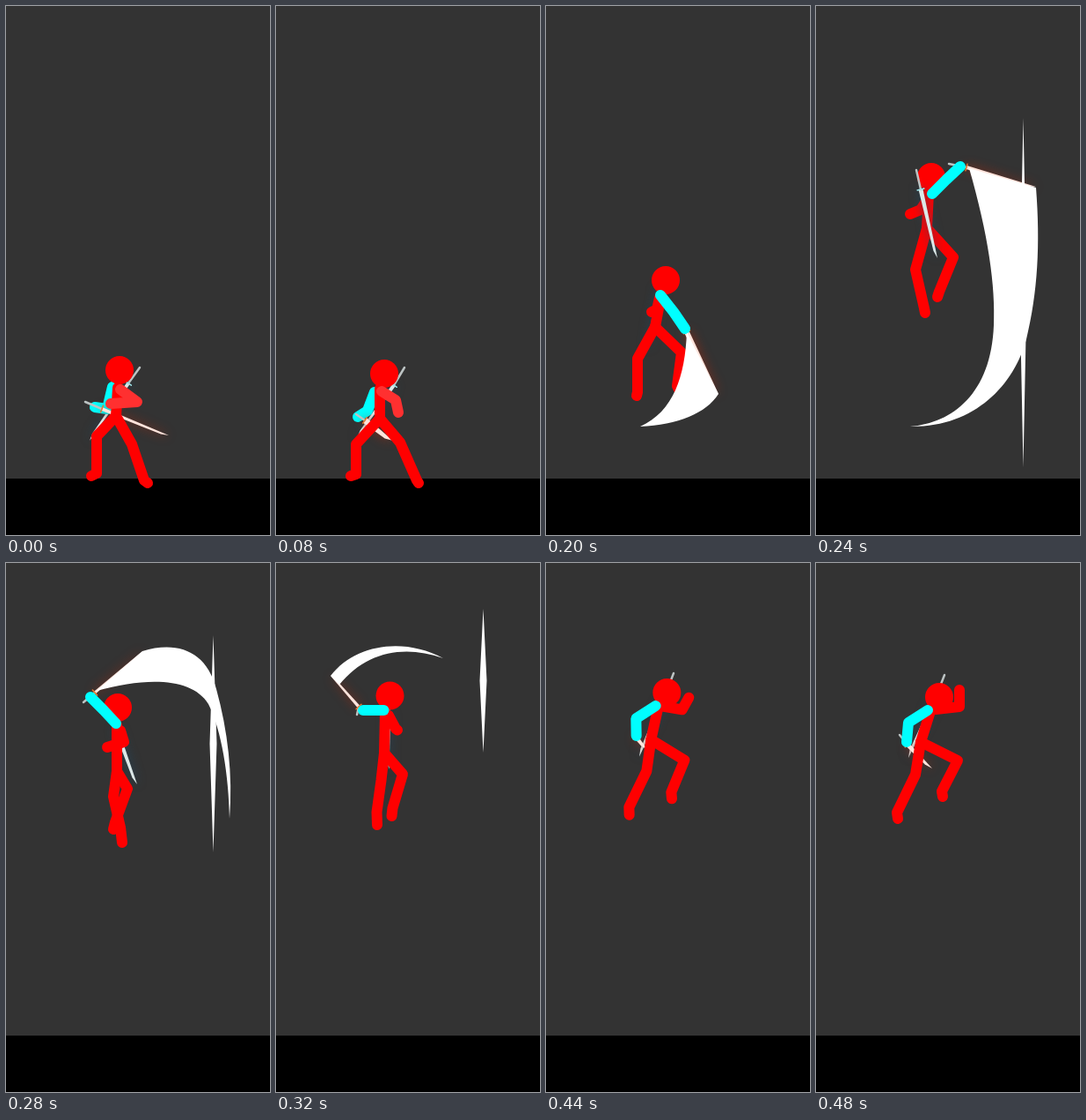
An HTML page with a canvas for the animation above (0.52 s loop, 300 px wide and 600 px high).

```html
<!DOCTYPE html>
<html lang="en">
<head>
<meta charset="utf-8">
<title>Sword leap</title>
<style>
  html, body { margin: 0; width: 100%; height: 100%; overflow: hidden; background: #333; }
  canvas { display: block; }
</style>
</head>
<body>
<canvas id="stage" width="300" height="600"></canvas>
<script>
const ctx = document.getElementById('stage').getContext('2d');
const STEP = 40, STEPS = 13;
const RED = '#f00', PALE = '#ff3030', CYAN = '#0ff';

// Joints are x,y pairs: limbs run outward from the body, swords run pommel, guard, tip.
const guardPose = {
  at: 0, head: [129, 413], torso: [127, 433, 125, 465],
  rear: [103, 488, 103, 530, 97, 533], lead: [143, 497, 157, 538, 161, 541],
  free: [130, 435, 149, 449, 119, 451], grip: [121, 432, 115, 457, 101, 455],
  back: [152, 410, 139, 428, 95, 493], held: [90, 449, 109, 457, 185, 487], width: [4, 4]
};
const windPose = {
  at: 2, head: [123, 417], torso: [118, 434, 118, 468],
  rear: [91, 497, 91, 531, 85, 533], lead: [141, 495, 160, 538, 162, 541],
  free: [120, 437, 136, 447, 139, 461], grip: [112, 438, 104, 459, 93, 466],
  back: [146, 410, 134, 430, 92, 490], held: [91, 463, 101, 470, 133, 493], width: [4, 7]
};
const crouchPose = {
  at: 4, head: [141, 429], torso: [132, 443, 121, 473],
  rear: [92, 500, 86, 532, 82, 533], lead: [155, 500, 157, 537, 164, 538],
  free: [130, 445, 134, 452, 134, 455], grip: [126, 441, 107, 452, 88, 464],
  back: [150, 416, 140, 432, 95, 492], held: [92, 462, 85, 464, 48, 476], width: [6, 9]
};
const risePose = {
  at: 5, head: [136, 311], torso: [131, 327, 124, 364],
  rear: [104, 400, 104, 438, 103, 442], lead: [154, 393, 149, 431, 151, 435],
  free: [129, 331, 126, 344, 120, 347], grip: [130, 328, 145, 347, 158, 366],
  back: [132, 301, 130, 320, 116, 389], held: [151, 350, 160, 370, 196, 440], width: [5, 6]
};
const cutPose = {
  at: 6, head: [131, 194], torso: [128, 211, 126, 252],
  rear: [113, 299, 123, 343, 124, 348], lead: [156, 285, 140, 324, 138, 330],
  free: [128, 217, 119, 231, 107, 236], grip: [132, 213, 148, 197, 164, 182],
  back: [114, 186, 119, 208, 138, 286], held: [151, 179, 171, 183, 250, 205], width: [5, 4]
};
const overPose = {
  at: 7, head: [127, 164], torso: [126, 184, 126, 236],
  rear: [122, 265, 130, 300, 132, 317], lead: [138, 256, 124, 294, 122, 302],
  free: [130, 190, 134, 203, 115, 209], grip: [125, 182, 111, 167, 96, 152],
  back: [117, 167, 125, 188, 149, 251], held: [88, 158, 101, 147, 155, 100], width: [5, 3]
};
const runPose = {
  at: 9, head: [132, 137], torso: [122, 156, 120, 195],
  rear: [117, 228, 99, 265, 98, 277], lead: [150, 223, 141, 262, 141, 272],
  free: [126, 156, 138, 173, 161, 170], grip: [120, 152, 97, 167, 102, 182],
  back: [143, 121, 131, 153, 108, 217], held: [105, 184, 99, 180, 83, 171], width: [4, 4]
};
const driftPose = {
  at: 12, head: [140, 152], torso: [130, 168, 119, 203],
  rear: [113, 240, 92, 283, 93, 290], lead: [161, 224, 143, 259, 144, 265],
  free: [136, 166, 163, 163, 163, 144], grip: [127, 167, 105, 181, 103, 203],
  back: [146, 127, 134, 158, 105, 221], held: [95, 195, 104, 206, 132, 233], width: [5, 5]
};
const poses = [guardPose, windPose, crouchPose, risePose, cutPose, overPose, runPose, driftPose];

// Each streak is top, bottom on the same vertical line.
const streaks = { 6: [127, 523], 7: [82, 328], 8: [52, 215], 9: [28, 106], 10: [22, 40] };
const slashes = {
  5: 'M160 370 C158 420 145 460 107 477 C150 475 182 462 196 440 Z',
  6: 'M174 184 C196 260 204 318 202 362 C199 440 155 473 107 477 C180 478 225 430 239 378 C252 325 255 270 250 206 Z',
  7: 'M103 145 L155 100 C195 88 228 100 239 143 C252 190 258 240 254 290 C253 240 245 190 230 160 C212 130 160 129 103 145 Z',
  8: 'M62 128 C90 92 145 84 190 108 C145 92 102 101 72 138 Z'
};

function poseAt(step) {
  const next = poses.find(p => p.at >= step);
  if (next.at === step) return next;
  const prev = poses[poses.indexOf(next) - 1];
  const t = (step - prev.at) / (next.at - prev.at);
  const mixed = {};
  for (const part in prev) {
    if (part !== 'at') mixed[part] = prev[part].map((v, i) => v + (next[part][i] - v) * t);
  }
  if (step === 8) mixed.held = [92, 172, 94, 163, 62, 128];
  return mixed;
}

function line(points, color, width) {
  ctx.beginPath();
  for (let i = 0; i < points.length; i += 2) ctx.lineTo(points[i], points[i + 1]);
  ctx.strokeStyle = color;
  ctx.lineWidth = width;
  ctx.stroke();
}

function glow(color, blur) {
  ctx.shadowColor = color;
  ctx.shadowBlur = blur;
}

function sword([px, py, gx, gy, tx, ty], width, blade, aura, trim) {
  const length = Math.hypot(tx - gx, ty - gy);
  const ux = (tx - gx) / length, uy = (ty - gy) / length;
  const nx = -uy * width / 2, ny = ux * width / 2;
  ctx.save();
  glow(aura, 12);
  ctx.beginPath();
  ctx.moveTo(gx + nx, gy + ny);
  ctx.lineTo(tx - ux * 9 + nx, ty - uy * 9 + ny);
  ctx.lineTo(tx, ty);
  ctx.lineTo(gx - nx, gy - ny);
  ctx.fillStyle = blade;
  ctx.fill();
  ctx.restore();
  line([px, py, gx, gy], '#bcc3c3', 2.5);
  line([gx - uy * 4, gy + ux * 4, gx + uy * 4, gy - ux * 4], trim, 1.5);
}

function streak([top, bottom]) {
  const mid = (top + bottom) / 2;
  const half = Math.min(4, (bottom - top) / 40);
  ctx.beginPath();
  ctx.moveTo(235.5, top);
  ctx.quadraticCurveTo(235.5 + half * 1.2, mid, 235.5, bottom);
  ctx.quadraticCurveTo(235.5 - half * 1.2, mid, 235.5, top);
  ctx.lineTo(235.5 + half, mid);
  ctx.lineTo(235.5, bottom);
  ctx.lineTo(235.5 - half, mid);
  ctx.fillStyle = '#fff';
  ctx.fill('nonzero');
}

function drawFigure(pose, step) {
  const facingAway = step < 4;
  const hip = pose.torso.slice(2);
  const backSword = () => sword(pose.back, pose.width[0], '#dce8e8', '#1e4a66', '#9fe8ec');
  const heldSword = () => sword(pose.held, pose.width[1], '#ffe4dc', '#a02a12', '#e87830');
  const gripArm = () => line(pose.grip, CYAN, 12);

  if (step !== 6) backSword();
  if (facingAway) gripArm();
  heldSword();
  if (!facingAway) line(pose.free, RED, 12);
  line([...hip, ...pose.rear], RED, 12);
  line([...hip, ...pose.lead], RED, 12);
  line(pose.torso, RED, 12);
  ctx.beginPath();
  ctx.arc(...pose.head, 16, 0, Math.PI * 2);
  ctx.fillStyle = RED;
  ctx.fill();
  if (step === 6) backSword();
  if (facingAway) line(pose.free, PALE, 12);
  else gripArm();
}

function draw(step) {
  ctx.fillStyle = '#333';
  ctx.fillRect(0, 0, 300, 600);
  ctx.fillStyle = '#000';
  ctx.fillRect(0, 536, 300, 64);
  ctx.lineCap = ctx.lineJoin = 'round';
  drawFigure(poseAt(step), step);
  if (slashes[step]) {
    ctx.fillStyle = '#fff';
    ctx.fill(new Path2D(slashes[step]));
  }
  if (streaks[step]) streak(streaks[step]);
}

const start = performance.now();
function tick() {
  draw(Math.floor((performance.now() - start) / STEP) % STEPS);
  requestAnimationFrame(tick);
}
tick();
</script>
</body>
</html>
```
